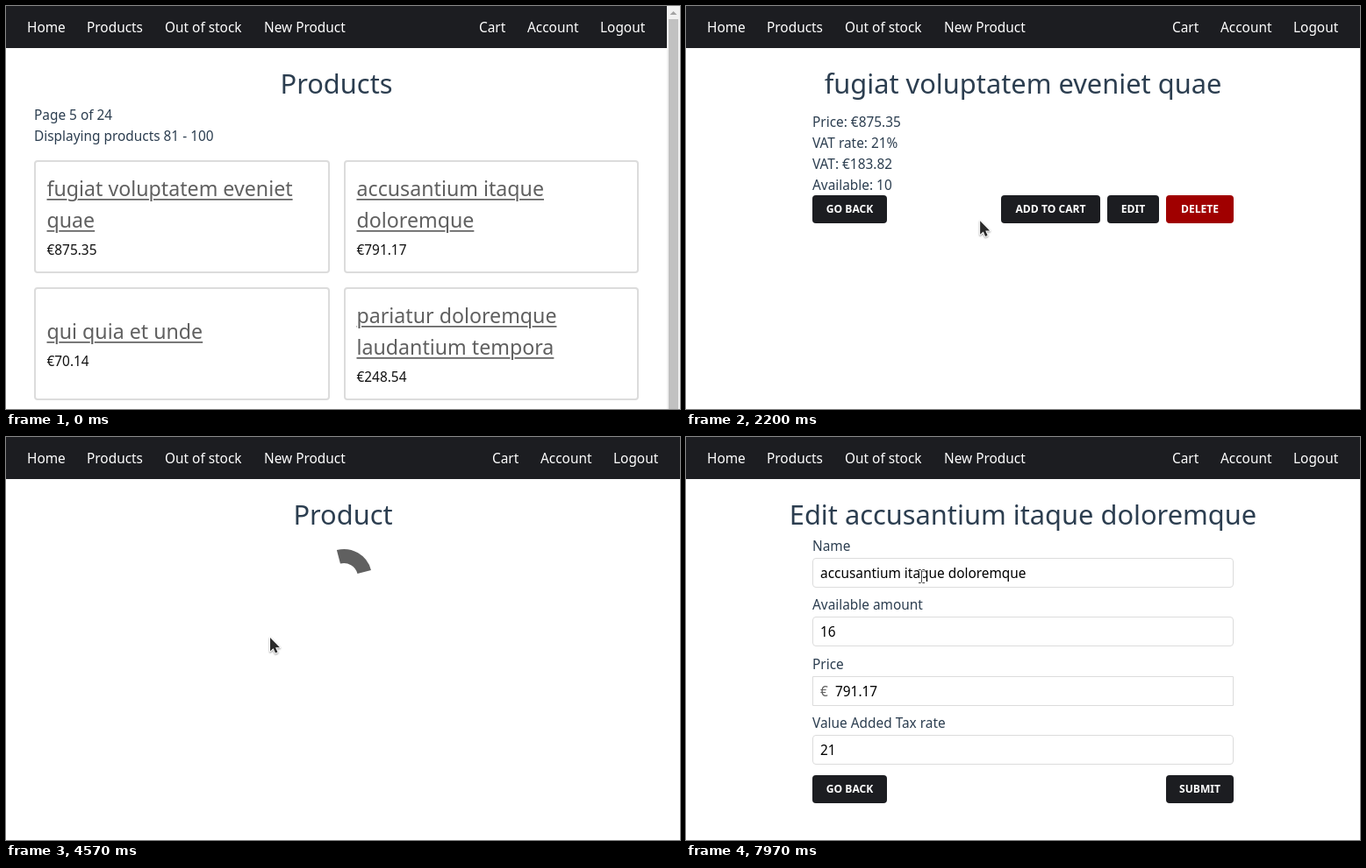
These frames come from a looping animation (768x460 px, 8 s). An HTML page with a canvas:

```html
<!DOCTYPE html>
<html lang="en">
<head>
<meta charset="utf-8">
<title>Product shop</title>
<style>
  html, body { margin: 0; width: 100%; height: 100%; overflow: hidden; background: #fff; }
  canvas { display: block; }
</style>
</head>
<body>
<canvas id="stage" width="768" height="460"></canvas>
<script>
const ctx = document.getElementById('stage').getContext('2d');
const LOOP = 8000;
const DARK = '#1c1d21', RED = '#a00000', BLUE = '#2c3e50', GREY = '#606060';
const SMALL = 15.4, LINK = 23.2, HEADING = 30.8;

const fugiat = { lines: ['fugiat voluptatem eveniet', 'quae'], price: '875.35', vat: '183.82', stock: 10 };
const accusantium = { lines: ['accusantium itaque', 'doloremque'], price: '791.17', vat: '166.15', stock: 16 };
const quiQuia = { lines: ['qui quia et unde'], price: '70.14' };
const pariatur = { lines: ['pariatur doloremque', 'laudantium tempora'], price: '248.54' };
const error = { lines: ['error maiores voluptas', 'libero'], price: '335.94' };
const fullName = product => product.lines.join(' ');

const scenes = [
  { start: 0, view: 'list', items: [fugiat, accusantium, quiQuia, pariatur] },
  { start: 1322, view: 'loading' },
  { start: 1640, view: 'product', item: fugiat },
  { start: 3200, view: 'list', items: [fugiat, accusantium, quiQuia, pariatur] },
  { start: 3450, view: 'list', items: [accusantium, quiQuia, pariatur, error] },
  { start: 4470, view: 'loading' },
  { start: 4790, view: 'product', item: accusantium },
  { start: 6850, view: 'edit', item: accusantium },
];
const sceneAt = t => scenes.findLast(s => s.start <= Math.max(t, 0));

// Pointer path: time, x, y
const path = [
  [0, 300, 482], [150, 296, 464], [850, 225, 210], [1780, 225, 210], [2080, 300, 247],
  [2600, 556, 235], [4000, 556, 235], [4100, 301, 229], [4600, 301, 229], [5000, 205, 232],
  [5200, 205, 232], [5330, 234, 242], [5750, 340, 273], [6250, 510, 241], [7000, 510, 241],
  [7450, 358, 197], [7850, 263, 158], [7960, 268.5, 159], [8000, 268.5, 159],
];
function pointerAt(t) {
  const i = Math.max(1, path.findIndex(p => p[0] > t));
  const [t0, x0, y0] = path[i - 1], [t1, x1, y1] = path[i];
  const u = Math.max(0, (t - t0) / (t1 - t0)), e = u * u * (3 - 2 * u);
  return [x0 + (x1 - x0) * e, y0 + (y1 - y0) * e];
}

const box = (x, y, w, h, label, color = DARK) => ({ x, y, w, h, label, color });
const cards = [box(32, 176, 337, 129), box(385, 176, 336, 129), box(32, 321, 337, 129), box(385, 321, 336, 129)];
const productButtons = [
  box(144, 216, 85, 32, 'GO BACK'), box(359, 216, 113, 32, 'ADD TO CART'),
  box(480, 216, 59, 32, 'EDIT'), box(547, 216, 77, 32, 'DELETE', RED),
];
const editButtons = [box(144, 386, 85, 32, 'GO BACK'), box(547, 386, 77, 32, 'SUBMIT')];
const inputs = [138, 205, 273, 340].map(y => box(144, y, 480, 34));
const targets = { list: cards, product: productButtons, edit: editButtons, loading: [] };

const inside = (b, [x, y]) => x >= b.x && x < b.x + b.w && y >= b.y && y < b.y + b.h;

// Hover transition as a moving average of recent pointer hits
function hover(b, t, view) {
  const samples = 15, lag = 35, duration = 150;
  let hits = 0;
  for (let i = 0; i < samples; i++) {
    const past = t - lag - i * duration / samples;
    if (sceneAt(past).view === view && inside(b, pointerAt(past))) hits++;
  }
  return hits / samples;
}

function text(str, x, y, size = SMALL, color = BLUE, align = 'left', weight = 400) {
  ctx.font = `${weight} ${size}px "Noto Sans", sans-serif`;
  ctx.textAlign = align;
  ctx.fillStyle = color;
  ctx.fillText(str, x, y);
}

function link(str, x, y) {
  text(str, x, y, LINK, GREY);
  ctx.fillRect(x, y + 3, ctx.measureText(str).width, 1.7);
  ctx.strokeStyle = '#fff';
  ctx.lineWidth = 3;
  ctx.strokeText(str, x, y);
  ctx.fillText(str, x, y);
}

function roundBox(x, y, w, h, r = 4) {
  ctx.beginPath();
  ctx.roundRect(x, y, w, h, r);
}

function button(b, alpha = 1) {
  ctx.save();
  ctx.globalAlpha *= alpha;
  ctx.fillStyle = b.color;
  roundBox(b.x, b.y, b.w, b.h);
  ctx.fill();
  text(b.label, b.x + b.w / 2, b.y + 20, 12.1, '#fff', 'center', 700);
  ctx.restore();
}

const heading = (str, width) => text(str, width / 2, 100, HEADING, BLUE, 'center');

function navbar(width) {
  ctx.fillStyle = DARK;
  ctx.fillRect(0, 0, width, 48);
  const entries = [['Home', 24], ['Products', 92], ['Out of stock', 181], ['New Product', 294],
    ['Cart', width - 214], ['Account', width - 159], ['Logout', width - 76]];
  for (const [label, x] of entries) text(label, x, 30, SMALL, '#fff');
}

function scrollbar() {
  ctx.fillStyle = '#f1f1f1';
  ctx.fillRect(753, 0, 15, 460);
  ctx.fillStyle = '#c1c1c1';
  ctx.fillRect(755, 15, 11, 445);
  ctx.fillStyle = '#a3a3a3';
  ctx.beginPath();
  ctx.moveTo(756.5, 10);
  ctx.lineTo(760.5, 6);
  ctx.lineTo(764.5, 10);
  ctx.fill();
}

function card(b, product, amount) {
  const cx = b.x + b.w / 2, cy = b.y + b.h / 2, scale = 1 + 0.04 * amount;
  ctx.save();
  ctx.translate(cx, cy);
  ctx.scale(scale, scale);
  ctx.translate(-cx, -cy);
  ctx.save();
  ctx.shadowColor = `rgba(0,0,0,${0.16 * amount})`;
  ctx.shadowBlur = 4;
  ctx.shadowOffsetY = 1;
  ctx.fillStyle = '#fff';
  roundBox(b.x, b.y, b.w, b.h);
  ctx.fill();
  ctx.restore();
  const shade = 220 + 12 * amount;
  ctx.strokeStyle = `rgb(${shade},${shade},${shade})`;
  ctx.lineWidth = 2;
  roundBox(b.x + 1, b.y + 1, b.w - 2, b.h - 2, 3);
  ctx.stroke();
  const top = b.y + (product.lines.length > 1 ? 41 : 59);
  product.lines.forEach((line, i) => link(line, b.x + 14.5, top + 36 * i));
  text('€' + product.price, b.x + 14.5, top + 36 * product.lines.length - 5, SMALL, '#111');
  if (amount > 0) button(box(b.x + b.w - 119, b.y + 90, 113, 32, 'ADD TO CART'), amount);
  ctx.restore();
}

const views = {
  list(scene, t) {
    heading('Products', 753);
    text('Page 5 of 24', 32, 130);
    text('Displaying products 81 - 100', 32, 154);
    cards.map((b, i) => ({ b, product: scene.items[i], amount: hover(b, t, 'list') }))
      .sort((a, b) => a.amount - b.amount)
      .forEach(c => card(c.b, c.product, c.amount));
    scrollbar();
  },
  loading(scene, t) {
    heading('Product', 768);
    const angle = (t - scene.start) / 1200 * 2 * Math.PI - Math.PI / 2;
    ctx.strokeStyle = GREY;
    ctx.lineWidth = 16;
    ctx.beginPath();
    ctx.arc(385, 160, 24, angle - Math.PI / 4, angle + Math.PI / 4);
    ctx.stroke();
  },
  product({ item }, t) {
    heading(fullName(item), 768);
    [`Price: €${item.price}`, 'VAT rate: 21%', `VAT: €${item.vat}`, `Available: ${item.stock}`]
      .forEach((line, i) => text(line, 144, 138 + 24 * i));
    productButtons.forEach(b => button(b, 1 - 0.4 * hover(b, t, 'product')));
  },
  edit({ item }, t) {
    heading('Edit ' + fullName(item), 768);
    const labels = ['Name', 'Available amount', 'Price', 'Value Added Tax rate'];
    const values = [fullName(item), item.stock, item.price, 21];
    inputs.forEach((b, i) => {
      const isPrice = i === 2;
      text(labels[i], b.x, b.y - 8);
      ctx.strokeStyle = '#dcdcdc';
      ctx.lineWidth = 1;
      roundBox(b.x + 0.5, b.y + 0.5, b.w - 1, b.h - 1, isPrice ? 0 : 3.5);
      ctx.stroke();
      if (isPrice) text('€', 153, b.y + 23, SMALL, GREY);
      text(values[i], isPrice ? 170 : 153, b.y + 23, SMALL, '#000');
    });
    editButtons.forEach(b => button(b, 1 - 0.4 * hover(b, t, 'edit')));
  },
};

const arrowShape = new Path2D('M0 0V15.5L3.6 12.2L6 17.6L8.5 16.5L6.1 11.2H11Z');
const handShape = new Path2D('M-1.6 1Q0-1 1.4 1L1.8 5.5L7.5 7Q9 8 8.8 10L7.8 15.5H-.8L-5.6 9.6Q-5-7.5 -5 8Q-4 7-1.4 9.4Z'
  .replace('Q-5-7.5 -5 8', 'L-5 8'));

function pointer(t, view) {
  const at = pointerAt(t);
  ctx.save();
  ctx.translate(...at);
  if (view === 'edit' && inputs.some(b => inside(b, at))) {
    const beam = new Path2D('M-3.5-7.5H-1L0-6.5L1-7.5H3.5M0-6.5V6.5M-3.5 7.5H-1L0 6.5L1 7.5H3.5');
    ctx.strokeStyle = '#fff';
    ctx.lineWidth = 3;
    ctx.stroke(beam);
    ctx.strokeStyle = '#444';
    ctx.lineWidth = 1;
    ctx.stroke(beam);
  } else {
    const shape = targets[view].some(b => inside(b, at)) ? handShape : arrowShape;
    ctx.save();
    ctx.shadowColor = 'rgba(0,0,0,.4)';
    ctx.shadowBlur = 2;
    ctx.shadowOffsetY = 1;
    ctx.strokeStyle = '#fff';
    ctx.lineWidth = 2;
    ctx.lineJoin = 'round';
    ctx.stroke(shape);
    ctx.restore();
    ctx.fillStyle = '#2b2b2b';
    ctx.fill(shape);
  }
  ctx.restore();
}

function draw(now) {
  const t = now % LOOP, scene = sceneAt(t);
  ctx.fillStyle = '#fff';
  ctx.fillRect(0, 0, 768, 460);
  navbar(scene.view === 'list' ? 753 : 768);
  views[scene.view](scene, t);
  pointer(t, scene.view);
  requestAnimationFrame(draw);
}
requestAnimationFrame(draw);
</script>
</body>
</html>
```
